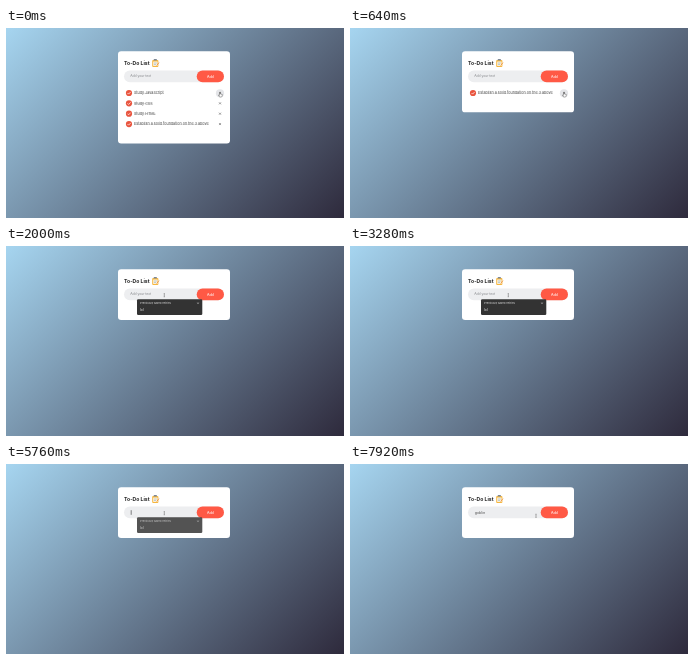
An HTML page with a canvas for the animation above (8 s loop, 338 by 190 pixels).

```html
<!DOCTYPE html>
<html lang="en">
<head>
<meta charset="utf-8">
<title>To-Do List</title>
<style>
  html, body { margin: 0; width: 100%; height: 100%; overflow: hidden; }
  body { background: linear-gradient(135deg, #a6d5f0, #2e2a3c); }
  canvas { display: block; width: 100vw; height: 100vh; }
</style>
</head>
<body>
<canvas id="stage"></canvas>
<script>
const W = 338, H = 190, LOOP = 8000, ROW = 10.35;
const canvas = document.getElementById('stage');
const ctx = canvas.getContext('2d');
const ratio = window.devicePixelRatio || 1;
canvas.width = W * ratio;
canvas.height = H * ratio;

const tasks = ['Study JavaScript', 'Study CSS', 'Study HTML', 'Establish a solid foundation on the 3 above'];
const removals = [80, 320, 640, 880];
const word = 'goblin';
const keyTimes = [5840, 6160, 6400, 6560, 6880, 7200];
const TYPING = 5760;

const countPassed = (times, t) => times.filter(at => t >= at).length;
const clamp = v => Math.max(0, Math.min(1, v));
const ease = v => v * v * (3 - 2 * v);
const mix = (a, b, k) => a + (b - a) * k;

function box(x, y, w, h, r, fill) {
  ctx.fillStyle = fill;
  ctx.beginPath();
  ctx.roundRect(x, y, w, h, r);
  ctx.fill();
}

function disc(x, y, r, fill) {
  ctx.fillStyle = fill;
  ctx.beginPath();
  ctx.arc(x, y, r, 0, Math.PI * 2);
  ctx.fill();
}

function line(points, color, width) {
  ctx.strokeStyle = color;
  ctx.lineWidth = width;
  ctx.beginPath();
  points.forEach(([x, y]) => ctx.lineTo(x, y));
  ctx.stroke();
}

function text(str, x, y, size, color, weight = 400) {
  ctx.font = `${weight} ${size}px Inter, sans-serif`;
  ctx.textBaseline = 'middle';
  ctx.fillStyle = color;
  ctx.fillText(str, x, y);
  return ctx.measureText(str).width;
}

function cross(x, y, r, color, width) {
  line([[x - r, y - r], [x + r, y + r]], color, width);
  line([[x - r, y + r], [x + r, y - r]], color, width);
}

function drawHeader() {
  text('To-Do List', 118, 35.2, 5.1, '#222', 700);
  box(146.2, 32, 6.2, 7, 1, '#f5b63f');
  box(147.2, 33.4, 4.4, 4.6, 0.3, '#fff3dc');
  box(147.7, 31, 3.2, 1.6, 0.6, '#7d8794');
  line([[148, 35], [150.8, 35]], '#6f9fc0', 0.5);
  line([[148, 36.6], [150, 36.6]], '#6f9fc0', 0.5);
  line([[150.6, 37.6], [153, 34.6]], '#e88a3a', 0.8);
}

function drawTask(label, y, hovered) {
  disc(123, y, 3.1, '#e9553f');
  line([[121.5, y], [122.6, y + 1.1], [124.6, y - 1]], '#fff', 0.7);
  const width = text(label, 128, y + 0.1, 3.7, '#555');
  line([[128, y + 0.3], [128 + width, y + 0.3]], '#777', 0.25);
  if (hovered) disc(214, y + 0.3, 4.1, '#e4e5e8');
  cross(214, y, 1, '#444', 0.5);
}

function drawField(t) {
  box(118, 42.6, 100, 11.6, 5.8, '#edeef0');
  box(190.7, 42.6, 27.3, 11.6, 5.8, '#ff5945');
  text('Add', 201, 48.5, 3.5, '#fff', 500);

  let caretX = 124.4, caretOn = false;
  if (t < TYPING) {
    text('Add your text', 124.2, 48.5, 3.3, '#85868a');
    caretOn = t >= 1280 && Math.floor((t - 1340) / 533) % 2 === 0;
  } else {
    const typed = word.slice(0, countPassed(keyTimes, t));
    caretX = 125.2 + text(typed, 124.8, 48.5, 3.5, '#444');
    caretOn = t < 7840;
  }
  if (caretOn) line([[caretX, 46.2], [caretX, 50.8]], '#222', 0.55);
}

function drawSuggestions(t) {
  if (t < 1440 || t >= 5920) return;
  ctx.globalAlpha = t < TYPING ? 1 : t < 5840 ? 0.84 : 0.4;
  box(131, 53.2, 65.3, 15.8, 1.2, '#333');
  text('Previously saved entries', 134, 57.4, 2.7, '#e2e2e2');
  cross(192, 57.2, 0.8, '#ddd', 0.4);
  text('lol', 134, 64, 3.4, '#f2f2f2');
  ctx.globalAlpha = 1;
}

function drawHand(x, y) {
  ctx.lineJoin = 'round';
  ctx.beginPath();
  [[-0.6, -1.8], [0.2, -1.8], [0.3, 0], [2, 0.5], [1.9, 2], [1.3, 3], [-0.7, 3], [-1.9, 1], [-0.6, 1.2]]
    .forEach(([dx, dy]) => ctx.lineTo(x + dx, y + dy));
  ctx.closePath();
  ctx.fillStyle = '#fff';
  ctx.fill();
  ctx.strokeStyle = '#333';
  ctx.lineWidth = 0.4;
  ctx.stroke();
}

function drawPointer(t) {
  const toField = ease(clamp((t - 880) / 400));
  const toButton = clamp((t - 7760) / 160);
  const x = mix(mix(214.3, 158.3, toField), 186, toButton);
  const y = mix(mix(66, 49.2, toField), 51.8, toButton);
  if (t < 880) return drawHand(x, y);
  line([[x, y - 1.7], [x, y + 1.7]], '#444', 0.45);
  for (const end of [-1.7, 1.7]) line([[x - 0.6, y + end], [x + 0.6, y + end]], '#444', 0.3);
}

function draw(now) {
  const t = now % LOOP;
  ctx.setTransform(ratio, 0, 0, ratio, 0, 0);
  ctx.clearRect(0, 0, W, H);
  const remaining = tasks.slice(countPassed(removals, t));
  box(112, 23.2, 112, 50.8 + ROW * remaining.length, 3.2, '#fff');
  drawHeader();
  drawField(t);
  remaining.forEach((label, i) => drawTask(label, 65 + ROW * i, i === 0));
  drawSuggestions(t);
  drawPointer(t);
}

const start = performance.now();
function tick() {
  draw(performance.now() - start);
  requestAnimationFrame(tick);
}
tick();
</script>
</body>
</html>
```
